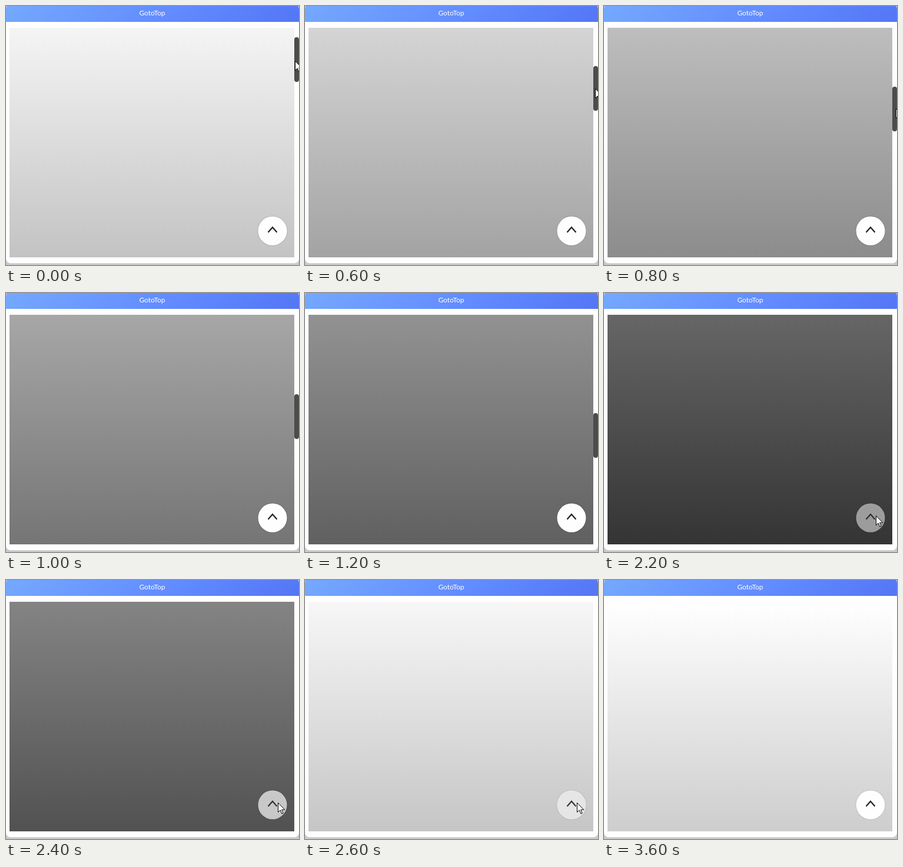
An HTML page for the animation above (4200 ms loop, 498 by 440 pixels).

```html
<!DOCTYPE html>
<html lang="en">
<head>
<meta charset="utf-8">
<title>GotoTop</title>
<style>
  html, body { margin: 0; width: 100%; height: 100%; overflow: hidden; background: #cacaca; }
  #card { position: absolute; left: 0; top: -3px; width: 498px; height: 440px; border-radius: 8px; overflow: hidden; background: #fefefe; }
  header { height: 30px; box-sizing: border-box; padding-top: 3px; background: linear-gradient(135deg, #75a9fd, #628cff 55%, #5476f5); color: #fff; font: 12px/24px Lato, sans-serif; text-align: center; text-indent: -1px; }
  #view { position: absolute; left: 6px; top: 40px; width: 484px; height: 390px; overflow: hidden; }
  #page { height: 2000px; background: linear-gradient(#fff, #000); }
  #thumb { position: absolute; left: 490px; top: 0; width: 8px; height: 76px; border-radius: 4px; background: #4c4c4c; }
  svg { position: absolute; left: 0; top: 0; }
  #button { filter: drop-shadow(0 0 1px rgba(0, 0, 0, .22)); }
</style>
</head>
<body>
<div id="card">
  <header>GotoTop</header>
  <div id="view"><div id="page"></div></div>
</div>
<div id="thumb"></div>
<svg width="498" height="440">
  <circle id="button" cx="453" cy="382" r="24.5" fill="#fefefe"/>
  <path id="chevron" d="M445.5 384.5L453 376L460.5 384.5" fill="none" stroke="#222" stroke-width="2.2"/>
  <path id="cursor" d="M.5 .5V16.5L4.2 13L6.8 19L9.2 18L6.6 12.2H11.7Z" fill="#fff" stroke="#000"/>
</svg>
<script>
const $ = id => document.getElementById(id);
const LOOP = 4200, STEP = 200, VIEW = 390, PAGE = 2000, TOP = 37;
const CLICK = 2218, SCROLL_TIME = 500, BOTTOM = 1200;

// Dragged thumb position and cursor position, one entry per step
const thumbY = [53, 62, 73, 102, 137, 172, 204, 237, 266, 271];
const cursorX = [491, 492, 493, 493, 496, 499, 499, 497, 494, 475];

const easeInOut = p => p < .5 ? 4 * p ** 3 : 1 - 4 * (1 - p) ** 3;

function scrollAt(time) {
  const i = time / STEP;
  if (i < thumbY.length - 1) return (thumbY[i] - TOP) * PAGE / VIEW;
  const p = Math.min(1, Math.max(0, (time - CLICK) / SCROLL_TIME));
  return BOTTOM * (1 - easeInOut(p));
}

function buttonAlpha(time) {
  if (time < 2000 || time >= 3400) return 1;
  if (time < 2200) return .75;
  if (time < 2400) return .52;
  return time < 3200 ? .7 : .87;
}

function cursorAt(i) {
  if (i < 9) return [cursorX[i], thumbY[i] + 40 - i * .8];
  return i === 9 ? [475, 375] : [462, 378];
}

function draw(now) {
  const time = Math.floor(now % LOOP / STEP) * STEP, i = time / STEP;
  $('page').style.transform = `translateY(${-scrollAt(time)}px)`;
  $('thumb').style.visibility = i < thumbY.length ? 'visible' : 'hidden';
  $('thumb').style.transform = `translateY(${thumbY[i] ?? 0}px)`;
  const alpha = buttonAlpha(time);
  $('button').setAttribute('fill-opacity', alpha);
  $('chevron').setAttribute('stroke-opacity', alpha < .8 ? .9 : 1);
  const [x, y] = cursorAt(i);
  $('cursor').setAttribute('transform', `translate(${x} ${Math.round(y)})`);
  $('cursor').setAttribute('visibility', time < 3200 ? 'visible' : 'hidden');
}

const start = performance.now();
function tick() {
  draw(performance.now() - start);
  requestAnimationFrame(tick);
}
tick();
</script>
</body>
</html>
```
